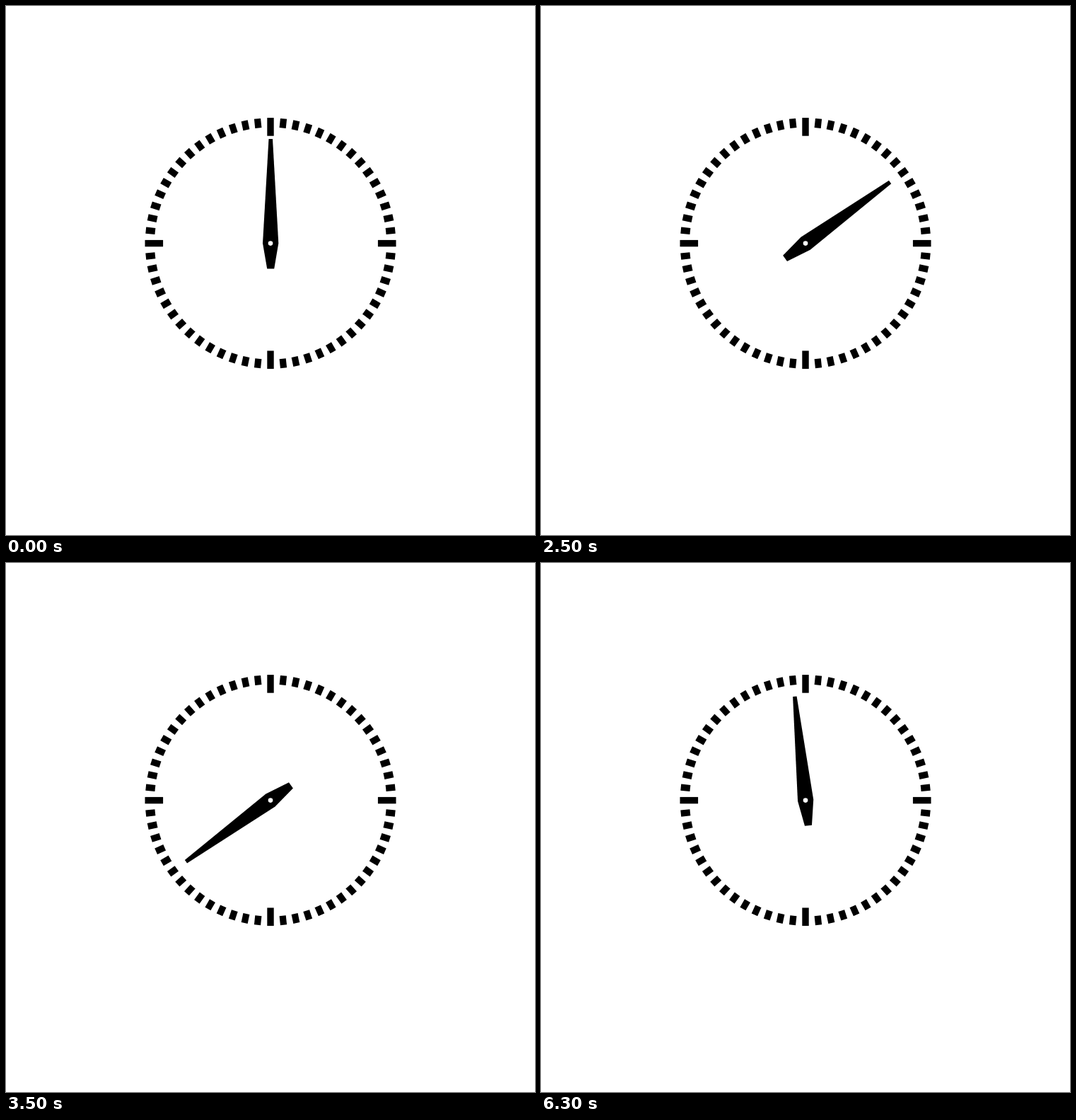
An HTML page for the animation above (6400 ms loop, 748 by 748 pixels).

```html
<!DOCTYPE html>
<html lang="en">
<head>
<meta charset="utf-8">
<title>Dial rotation range</title>
<style>
html, body { margin: 0; width: 100%; height: 100%; overflow: hidden; background: #fff; }
svg { display: block; width: 100%; height: 100%; }
text { font: 24px "Liberation Sans", Arial, sans-serif; text-anchor: middle; }
.name { font-weight: bold; font-size: 23.5px; }
.range { letter-spacing: .5px; }
.line { fill: none; stroke: #f00; stroke-width: 2; }
</style>
</head>
<body>
<svg viewBox="0 0 748 748">
  <g transform="translate(374 335.6)">
    <g id="ticks"></g>
    <path id="hand" d="M-2.5-147.6H3L11.3 0L5.2 35.9H-4.8L-11 0Z"/>
    <circle r="3.3" fill="#fff"/>
  </g>
  <g id="label" fill="#f00">
    <text class="name" x="375.3" y="40.5">vrot</text>
    <text class="range" id="range" x="375" y="68.5"></text>
    <path class="line" d="M374 83V120.5"/>
  </g>
  <g id="arc" fill="#f00">
    <path class="line" d="M393 105.8A233.6 233.6 0 1 1 331 108.9M348 84.5L351.5 121.5"/>
    <path d="M375 105.3L394.8 100.6L394 111.6ZM349.3 106.2L328.8 104.1L330.3 114.8Z"/>
  </g>
</svg>
<script>
const LOOP = 6400, STEP = 100, STEP_ANGLE = 18, MAX_ANGLE = 354;
const get = id => document.getElementById(id);
const show = (el, on) => el.setAttribute("visibility", on ? "visible" : "hidden");

for (let i = 0; i < 60; i++) {
  const tick = document.createElementNS("http://www.w3.org/2000/svg", "path");
  tick.setAttribute("d", i % 15 ? "M-4.6-177.2h9.2v13.2h-9.2Z" : "M-4.7-177.5h9.4v25.6h-9.4Z");
  tick.setAttribute("transform", `rotate(${i * 6})`);
  get("ticks").append(tick);
}

function draw(now) {
  const t = now % LOOP;
  const steps = Math.max(0, Math.floor((t - 2200) / STEP));
  const atMin = t >= 100 && t < 2100;
  const atMax = t >= 4300 && t < 6300;
  get("hand").setAttribute("transform", `rotate(${Math.min(MAX_ANGLE, steps * STEP_ANGLE)})`);
  get("range").textContent = atMin ? "Minimum" : "Maximum";
  show(get("label"), atMin || atMax);
  show(get("arc"), atMax);
}

const start = performance.now();
function frame() {
  draw(performance.now() - start);
  requestAnimationFrame(frame);
}
draw(0);
requestAnimationFrame(frame);
</script>
</body>
</html>
```
